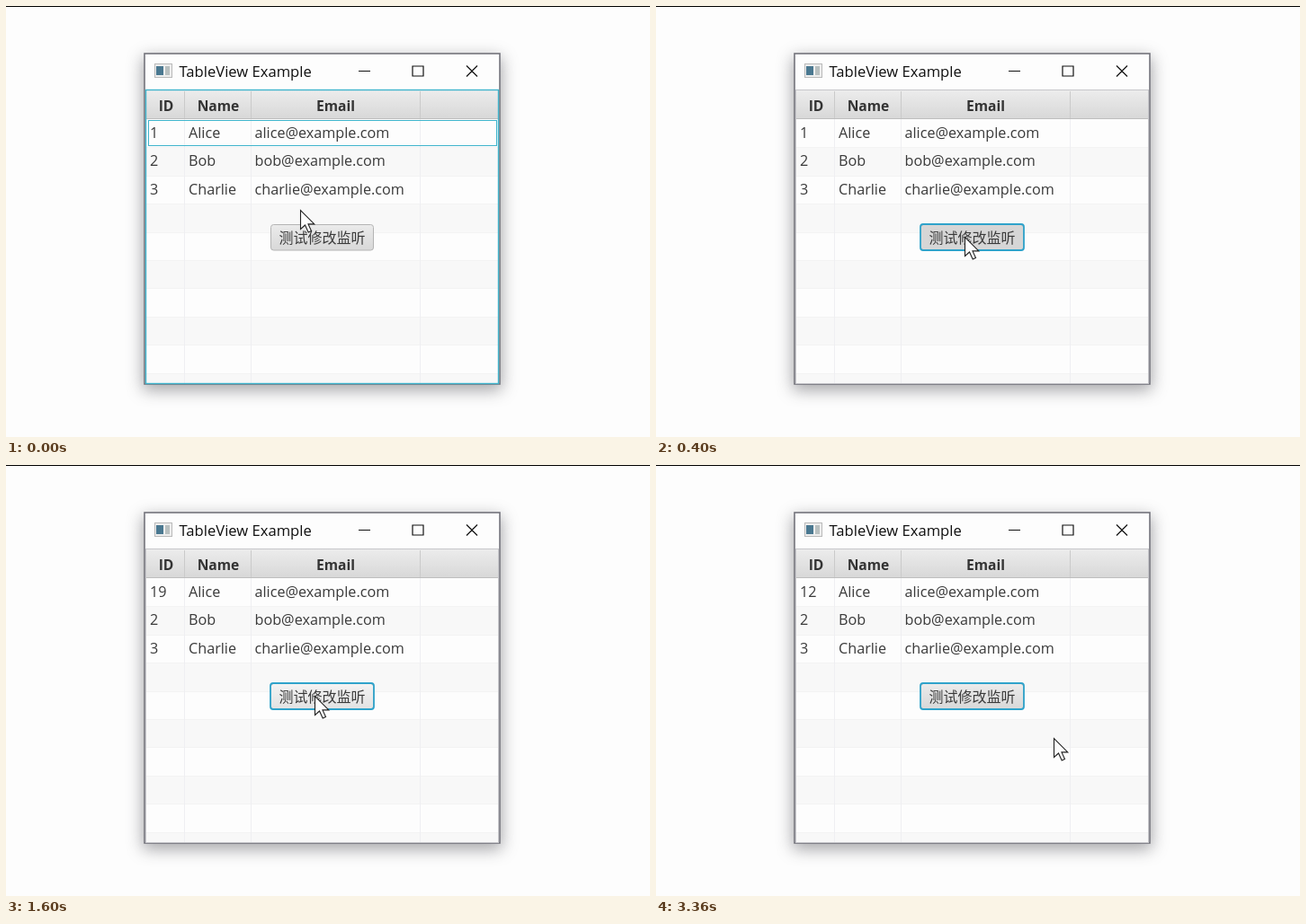
These frames come from a looping animation (716x480 px, 3400 ms). An HTML page:

```html
<!DOCTYPE html>
<html lang="en">
<head>
<meta charset="utf-8">
<title>Table demo</title>
<style>
  html, body { margin: 0; width: 100%; height: 100%; overflow: hidden; background: #fdfdfd; }
  svg { display: block; width: 100vw; height: 100vh; }
  text { font: 16.2px "Open Sans", "Noto Sans", "Noto Sans CJK SC", sans-serif; fill: #3a3a3a; }
  .title { font-size: 16.6px; fill: #101010; }
  .head { font-size: 15.6px; font-weight: 700; text-anchor: middle; fill: #333; }
  .label { font-size: 16px; font-family: "Noto Sans CJK SC", "Noto Sans CJK", sans-serif; text-anchor: middle; }
  .glyph { fill: none; stroke: #111; stroke-width: 1.2; }
  .focus { fill: none; stroke: #3fb4cc; }
</style>
</head>
<body>
<svg viewBox="0 0 716 480">
  <defs>
    <linearGradient id="header" x2="0" y2="1">
      <stop stop-color="#ececec"/><stop offset="1" stop-color="#d8d8d8"/>
    </linearGradient>
    <linearGradient id="idle" x2="0" y2="1">
      <stop stop-color="#ebebeb"/><stop offset="1" stop-color="#d8d8d8"/>
    </linearGradient>
    <linearGradient id="hover" x2="0" y2="1">
      <stop stop-color="#f3f3f3"/><stop offset="1" stop-color="#e2e2e2"/>
    </linearGradient>
    <filter id="blur" x="-20%" y="-20%" width="140%" height="140%">
      <feGaussianBlur stdDeviation="9"/>
    </filter>
  </defs>

  <rect width="716" height="480" fill="#fdfdfd"/>
  <rect width="716" height="1" fill="#000"/>

  <rect x="152" y="57" width="399" height="371" fill="#808084" opacity=".7" filter="url(#blur)"/>
  <rect x="154" y="53" width="395" height="368" fill="#fdfdfd" stroke="#74747c" stroke-width="1.6"/>

  <rect x="165.5" y="64.5" width="19" height="15" fill="#eeeeee" stroke="#b9b9b9"/>
  <rect x="167" y="67" width="8" height="10" fill="#4a7890"/>
  <rect x="177" y="67" width="5" height="10" fill="#b9c0c0"/>
  <text class="title" x="192.5" y="79">TableView Example</text>
  <path class="glyph" d="M392 72.5h13M452 67h12v11h-12zM512 66.5l12 12m0-12l-12 12"/>

  <g id="table"></g>
  <rect x="155.5" y="93.5" width="392" height="327" fill="none" stroke="#c6c6ca"/>
  <g id="tableFocus">
    <rect class="focus" x="155.5" y="93.5" width="392" height="327" stroke-width="1.4"/>
    <rect class="focus" x="158.5" y="127.5" width="387" height="28"/>
  </g>

  <rect id="button" x="294.5" y="243.5" width="114" height="28.5" rx="3" stroke="#b4b4b4"/>
  <rect id="buttonFocus" class="focus" x="294" y="243" width="115" height="29" rx="3" style="stroke:#2fa3cb;stroke-width:1.8"/>
  <text class="label" x="351.5" y="264">测试修改监听</text>
  <path id="cursor" d="M0 0V21l5-4.5 3.7 8 3.3-1.5-3.5-7.6h6.8z" fill="#fdfdfd" stroke="#222" stroke-width="1.1"/>
</svg>
<script>
const LOOP = 3400, STEP = 40;
const $ = id => document.getElementById(id);

const columns = [198.5, 272.5, 460.5];
const rowHeight = 31.4;
const people = [
  [1, "Alice", "alice@example.com"],
  [2, "Bob", "bob@example.com"],
  [3, "Charlie", "charlie@example.com"]
];

function buildTable() {
  let out = "";
  for (let i = 0; i < 10; i++) {
    const y = Math.round(126 + i * rowHeight);
    const h = Math.min(Math.round(126 + (i + 1) * rowHeight), 420) - y;
    out += `<rect x="156" y="${y}" width="391" height="${h}" fill="${i % 2 ? "#f8f8f8" : "#fdfdfd"}"/>`;
    if (i) out += `<path d="M156 ${y + .5}h391" stroke="#f3f3f3"/>`;
  }
  out += `<rect x="156" y="94" width="391" height="31" fill="url(#header)"/>
    <path d="M156 125.5h391" stroke="#bebebe"/>`;
  for (const x of columns)
    out += `<path d="M${x} 126V420" stroke="#efeff2"/><path d="M${x} 95V125" stroke="#cacaca"/>`;
  [["ID", 178], ["Name", 236], ["Email", 366.5]].forEach(([name, x]) =>
    out += `<text class="head" x="${x}" y="117">${name}</text>`);
  people.forEach((person, i) => person.forEach((value, j) =>
    out += `<text ${i + j ? "" : 'id="value"'} x="${[160, 203, 276.5][j]}" y="${147 + Math.round(i * rowHeight)}">${value}</text>`));
  $("table").innerHTML = out;
}

// Each click: press time, release time, resulting ID
const clicks = [
  [400, 600, 13], [1200, 1280, 19], [1920, 2000, 10], [2880, 2960, 12]
];

// Cursor path: time, x, y
const path = [
  [0, 327, 227], [280, 343, 257], [3240, 343, 257],
  [3280, 376, 282], [3320, 444, 311], [3360, 442, 304], [LOOP, 442, 304]
];

const easeOut = k => k * (2 - k);

function cursorAt(t) {
  const i = path.findIndex(p => p[0] > t);
  const [t0, x0, y0] = path[i - 1], [t1, x1, y1] = path[i];
  const k = easeOut((t - t0) / (t1 - t0));
  return [x0 + (x1 - x0) * k, y0 + (y1 - y0) * k];
}

function render(t) {
  const [x, y] = cursorAt(t);
  const over = x >= 294 && x <= 409 && y >= 243 && y <= 272;
  const pressed = clicks.some(([down, up]) => t >= down && t < up);
  const focused = t >= clicks[0][0];
  const last = clicks.filter(([, up]) => t >= up).pop();

  $("cursor").setAttribute("transform", `translate(${Math.round(x) + .5} ${Math.round(y) + .5})`);
  $("button").setAttribute("fill", pressed ? "#d6d6d6" : `url(#${over ? "hover" : "idle"})`);
  $("buttonFocus").style.display = focused ? "" : "none";
  $("tableFocus").style.display = focused ? "none" : "";
  $("value").textContent = last ? last[2] : 1;
}

function frame() {
  render(Math.floor(performance.now() % LOOP / STEP) * STEP);
  requestAnimationFrame(frame);
}

buildTable();
frame();
</script>
</body>
</html>
```
